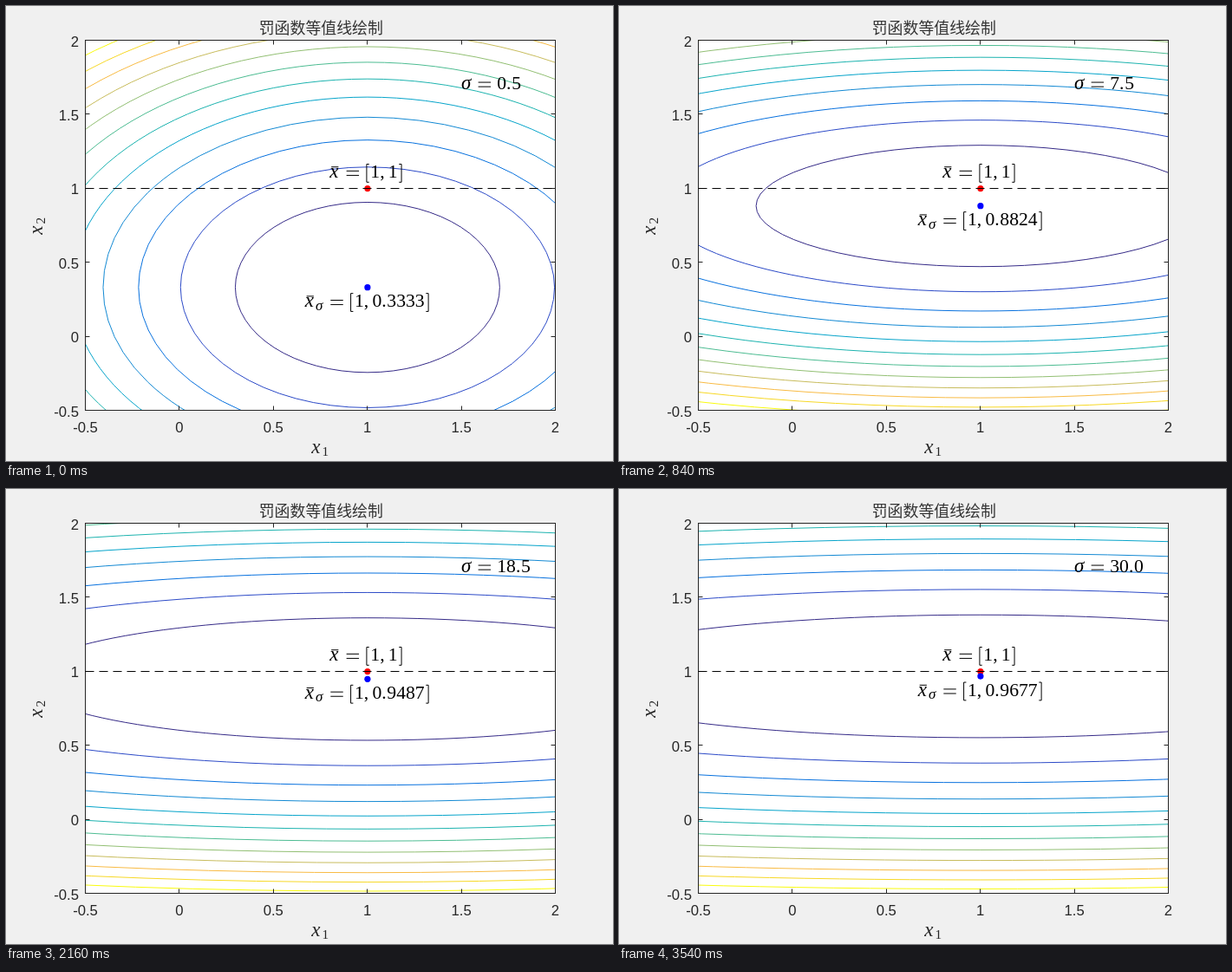
Write an HTML page that moves like this. It is 700 by 525 pixels and loops after 3.6 s.

```html
<!DOCTYPE html>
<html lang="zh">
<head>
<meta charset="utf-8">
<title>罚函数等值线绘制</title>
<style>
html, body { margin: 0; width: 100%; height: 100%; overflow: hidden; background: #f0f0f0; }
svg { display: block; }
.tick { font: 16.67px "Liberation Sans", Arial, sans-serif; fill: #262626; }
.title { font: 200 17.9px "Noto Sans CJK SC", "Noto Sans CJK", sans-serif; fill: #333; text-anchor: middle; }
.math { font-family: "Liberation Serif", "Times New Roman", serif; }
.label { fill: #262626; color: #262626; }
.rule { fill: none; stroke: currentColor; stroke-width: 1; }
</style>
</head>
<body>
<svg id="stage" width="700" height="525" viewBox="0 0 700 525">
  <clipPath id="area"><rect x="91.5" y="39.5" width="542" height="427"/></clipPath>
  <rect width="700" height="525" fill="#f0f0f0"/>
  <rect x="91.5" y="39.5" width="542" height="427" fill="#fff"/>
  <g id="curves" clip-path="url(#area)" fill="none" stroke-width="1"></g>
  <g id="axes" fill="none" stroke="#262626"></g>
  <circle id="goal" r="3.6" fill="#f00"/>
  <path d="M91.5 210.5H633.5" stroke="#000" stroke-dasharray="10 6"/>
  <circle id="best" r="3.6" fill="#00f"/>
  <text class="title" x="363.3" y="32">罚函数等值线绘制</text>
  <g id="words"></g>
</svg>
<script>
const NS = "http://www.w3.org/2000/svg";
const $ = id => document.getElementById(id);
const STEP = 60, COUNT = 60, LEVELS = 12;
const L = 91.5, T = 39.5, R = 633.5, B = 466.5;
// Data uses the exact axes size; the frame is snapped to whole pixels.
const UX = 0.775 * 700 / 2.5, UY = 0.815 * 525 / 2.5;
const px = x => 91.4 + (x + 0.5) * UX;
const py = y => 39.4 + (2 - y) * UY;
const EM = 21.67;
const COLORS = ["#352a87", "#2c4ac7", "#0871de", "#1389d3", "#06a4ca", "#1db3af",
  "#4dbc92", "#92bf73", "#c8bc5d", "#f8bb44", "#f7d826", "#f9fb0e"];

function add(parent, tag, attrs, text) {
  const el = document.createElementNS(NS, tag);
  for (const k in attrs) el.setAttribute(k, attrs[k]);
  if (text !== undefined) el.textContent = text;
  parent.appendChild(el);
  return el;
}

// Offsets below are in em, measured from the start of the formula.
function glyph(g, text, at, size = EM, dy = 0, italic = false) {
  return add(g, "text", {
    x: at * EM, y: dy, "font-size": size, "font-style": italic ? "italic" : "normal"
  }, text);
}
const letter = (g, text, at) => glyph(g, text, at, 23, 0, true);
const stroke = (g, d) => add(g, "path", { class: "rule", d });
const rule = (g, from, to, up) => stroke(g, `M${from * EM} ${-up * EM}H${to * EM}`);
function equals(g, at) {
  rule(g, at + 0.056, at + 0.722, 0.133);
  rule(g, at + 0.056, at + 0.722, 0.367);
}
function bracket(g, at, dir) {
  const x = (at + 0.139) * EM, w = dir * 2.8;
  stroke(g, `M${x + w / 2} ${-0.73 * EM}h${-w}V${0.23 * EM}h${w}`);
}
function barX(g) {
  letter(g, "x", 0.01);
  rule(g, 0.1, 0.48, 0.58);
}
function setNumber(el, text) {
  el.textContent = text;
  el.setAttribute("dx", [...text].map((c, i) => text[i - 1] === "." ? 0.6 : 0).join(" "));
}
const formula = (x, y) =>
  add($("words"), "g", { class: "math", transform: `translate(${x} ${y})` });

let frame = "";
for (let i = 0; i < 6; i++) {
  const v = i / 2 - 0.5;
  const tx = L + (R - L) * i / 5, ty = B - (B - T) * i / 5;
  const x = Math.floor(tx) + 0.5, y = Math.floor(ty) + 0.5;
  frame += `M${x} ${T}v5M${x} ${B}v-5M${L} ${y}h5M${R} ${y}h-5`;
  add($("words"), "text", { class: "tick", x: tx, y: 492, "text-anchor": "middle" }, v);
  add($("words"), "text", { class: "tick", x: 84, y: ty + 7, "text-anchor": "end" }, v);
}
add($("axes"), "path", { d: frame });
add($("axes"), "rect", { x: L, y: T, width: R - L, height: B - T });

const curves = COLORS.map(c => add($("curves"), "ellipse", { cx: px(1), stroke: c }));
for (const id of ["goal", "best"]) $(id).setAttribute("cx", px(1));
$("goal").setAttribute("cy", py(1));

function axisName(sub, transform) {
  const g = add($("words"), "g", { class: "math label", transform });
  letter(g, "x", 0.03);
  glyph(g, sub, 0.6, 15.2, 3);
}
axisName("1", "translate(351.5 515.5)");
axisName("2", "translate(41.5 264.5) rotate(-90)");

const sigma = formula(525, 96);
letter(sigma, "σ", 0);
equals(sigma, 0.849);
const sigmaText = glyph(sigma, "", 1.905);

const goalName = formula(373, 198.3);
barX(goalName);
equals(goalName, 0.85);
bracket(goalName, 1.906, 1);
glyph(goalName, "1", 2.184);
glyph(goalName, ",", 2.684);
glyph(goalName, "1", 3.129);
bracket(goalName, 3.629, -1);

const bestName = formula(0, 0);
barX(bestName);
glyph(bestName, "σ", 0.572, 17, 3.3, true);
equals(bestName, 1.32);
bracket(bestName, 2.376, 1);
glyph(bestName, "1", 2.654);
glyph(bestName, ",", 3.154);
const bestText = glyph(bestName, "", 3.599);
bracket(bestName, 6.377, -1);

// Penalty function: (x1 - 1)^2 + x2^2 + s (x2 - 1)^2, contoured at even levels.
function draw(time) {
  const s = 0.5 * (Math.floor(time / STEP) % COUNT + 1);
  const mid = s / (1 + s), cy = py(mid);
  const reach = Math.max(2 - mid, mid + 0.5);
  const gap = (1.5 ** 2 + (1 + s) * reach ** 2) / (LEVELS + 1);
  curves.forEach((e, i) => {
    const r = Math.sqrt(gap * (i + 1));
    e.setAttribute("cy", cy);
    e.setAttribute("rx", r * UX);
    e.setAttribute("ry", r / Math.sqrt(1 + s) * UY);
  });
  $("best").setAttribute("cy", cy);
  bestName.setAttribute("transform", `translate(344.5 ${cy + 22.8})`);
  setNumber(bestText, mid.toFixed(4));
  setNumber(sigmaText, s.toFixed(1));
}

function tick() {
  draw(performance.now());
  requestAnimationFrame(tick);
}
tick();
</script>
</body>
</html>
```
